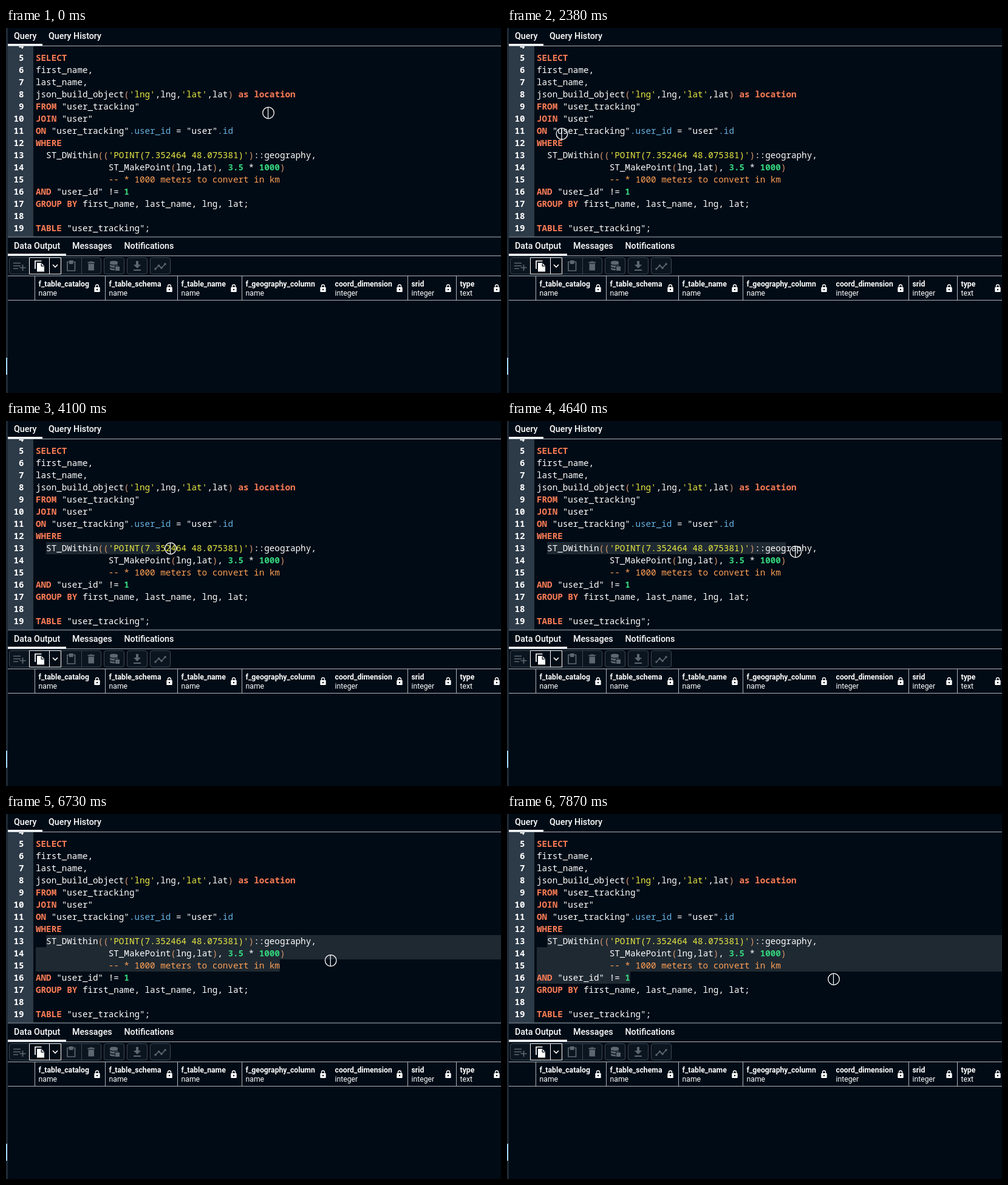
Animation, 815 px wide and 600 px high, one loop 7990 ms. Source, as an HTML page:

```html
<!DOCTYPE html>
<html lang="en">
<head>
<meta charset="utf-8">
<title>Query tool</title>
<style>
  html, body { margin: 0; width: 100%; height: 100%; overflow: hidden; background: #010b15; }
  svg { display: block; }
  text { white-space: pre; fill: #fff; }
  .code text { font: 500 14.25px "Noto Sans Mono", monospace; }
  .code .num { font-weight: 600; text-anchor: end; }
  .comment { fill: #ffa055; }
  .string { fill: #eaea43; }
  .keyword { fill: #fc7c56; font-weight: 700; }
  .column { fill: #67b3e3; }
  .number { fill: #35d37d; font-weight: 700; }
  .bracket { fill: #d6976f; }
  .tab { font: 500 14.25px Roboto, sans-serif; }
  .head { font: 700 12.22px Roboto, sans-serif; }
  .type { font: 400 12.22px Roboto, sans-serif; }
  .rule { fill: #a9b5c1; }
  .icon { fill: none; stroke: #5d6771; stroke-width: 1.7; }
  .icon .box { fill: #0b151f; stroke: #3c4853; stroke-width: 1; }
  .icon .solid { fill: #5d6771; stroke: none; }
  .icon.on, .icon.on .box { stroke: #fff; }
  .icon.on .box { fill: none; }
  .icon.on .solid { fill: #fff; }
</style>
</head>
<body>
<svg width="815" height="600" viewBox="0 0 815 600">
  <rect width="815" height="600" fill="#010b15"/>
  <rect x="3" y="30" width="42" height="313" fill="#2d3a48"/>
  <g id="selection" fill="#1f2932"></g>
  <g id="code" class="code"></g>

  <rect width="815" height="29" fill="#010b15"/>
  <rect class="rule" x="3" y="29" width="812" height="1"/>
  <rect x="3" y="26" width="57" height="3" fill="#fff"/>
  <text class="tab" x="13" y="18">Query</text>
  <text class="tab" x="70" y="18">Query History</text>

  <rect y="343" width="815" height="257" fill="#010b15"/>
  <rect x="3" y="342.5" width="812" height="2" fill="#5a6671"/>
  <rect class="rule" x="3" y="374" width="812" height="1"/>
  <rect x="3" y="371" width="96" height="3" fill="#fff"/>
  <text class="tab" x="13" y="363">Data Output</text>
  <text class="tab" x="109" y="363">Messages</text>
  <text class="tab" x="194.5" y="363">Notifications</text>

  <g class="icon">
    <rect class="box" x="5.5" y="377.5" width="151" height="27" rx="3.5"/>
    <path class="box" d="M124.5 377.5v27"/>
    <rect class="box" x="161.5" y="377.5" width="33" height="27" rx="3.5"/>
    <rect class="box" x="199.5" y="377.5" width="33" height="27" rx="3.5"/>
    <rect class="box" x="237.5" y="377.5" width="33" height="27" rx="3.5"/>
    <path d="M12 386.5h12M12 391h12M12 395.5h8M27.5 389v10M22.5 394h10"/>
    <path d="M101 384.5h12.500v14.500h-12.500z"/>
    <path class="solid" d="M104 382h6.500v6h-6.500z"/>
    <path class="solid" d="M134.500 384.500h3l1-1h3.500l1 1h3v2h-11.500zM135.500 387.500h9.500v11h-9.500z"/>
    <path class="solid" d="M171 385c0-3 13-3 13 0v2c0 3-13 3-13 0zM171 389c3 2 10 2 13 0v2h-5v3c-4 0-8-1-8-2zM171 394c2 1.500 5 1.500 8 1.500v3c-4 0-8-1-8-2zM180 392h7v7h-7z"/>
    <path class="solid" d="M214 383h4v6h4l-6 6-6-6h4zM210 397h12v2h-12z"/>
    <path d="M246 396l5.500-5.500 4.500 4 6-6.500"/>
    <path d="M246 396h0m5.500-5.500h0m4.500 4h0m6-6.500h0" stroke-width="3.600" stroke-linecap="round"/>
  </g>
  <g class="icon on">
    <rect x="38" y="377" width="53" height="28" fill="#010b15" stroke="none"/>
    <path class="box" d="M38.5 377.5h52v27h-52zM71.5 377.5v27"/>
    <path d="M48 396v-13h10.500"/>
    <path class="solid" d="M51 386h7l5 5v9.500H51z"/>
    <path d="M58.200 387v4.300h4.200" stroke="#010b15" stroke-width="1.200"/>
    <path d="M77 389l4 4 4-4"/>
  </g>

  <rect class="rule" x="3" y="407" width="812" height="1"/>
  <rect class="rule" x="3" y="447" width="812" height="1"/>
  <g id="columns"></g>

  <rect width="3" height="600" fill="#1f2a36"/>
  <rect y="542" width="2" height="28" fill="#9fd4f5"/>

  <rect id="caret" width="1.2" height="20" fill="#fff"/>
  <g id="pointer" fill="none" stroke="#fff">
    <circle id="ring" r="9.3" stroke-width="1.3"/>
    <path d="M-.5-9.5V9.5" stroke-width="1.2"/>
  </g>
</svg>
<script>
const LOOP = 7990, LEFT = 49, CHAR = 8.55, ROW = 20, WIDTH = 815;
const $ = id => document.getElementById(id);
const rowTop = line => 39 + (line - 5) * ROW;
const columnX = column => LEFT + column * CHAR;

const sql = `SELECT
first_name,
last_name,
json_build_object('lng',lng,'lat',lat) as location
FROM "user_tracking"
JOIN "user"
ON "user_tracking".user_id = "user".id
WHERE
  ST_DWithin(('POINT(7.352464 48.075381)')::geography,
              ST_MakePoint(lng,lat), 3.5 * 1000)
              -- * 1000 meters to convert in km
AND "user_id" != 1
GROUP BY first_name, last_name, lng, lat;

TABLE "user_tracking";`.split('\n');

const tokens = /(?<comment>--.*)|(?<string>'[^']*')|\b(?<keyword>SELECT|FROM|JOIN|ON|WHERE|AND|GROUP BY|TABLE|as location)\b|(?<column>\.(?:user_id|id)\b)|\b(?<number>3\.5|1000|1)\b|(?<bracket>[()])/g;

function highlight(line) {
  return line.replace(tokens, (match, ...rest) => {
    const kind = Object.entries(rest.at(-1)).find(([, value]) => value)[0];
    return `<tspan class="${kind}">${match}</tspan>`;
  });
}

$('code').innerHTML = ['', ...sql].map((line, i) => {
  const y = rowTop(i + 4) + 15;
  return `<text class="num" x="29.5" y="${y - 0.5}">${i + 4}</text>
    <text x="${LEFT}" y="${y}">${highlight(line)}</text>`;
}).join('');

function tableHead(columns) {
  let left = 47;
  return columns.map(([name, type, width, ruled = true]) => {
    const x = left;
    left += width;
    return `
      ${ruled ? `<rect class="rule" x="${x}" y="408" width="1" height="39"/>` : ''}
      <text class="head" x="${x + 6.5}" y="424.5">${name}</text>
      <text class="type" x="${x + 6.5}" y="440">${type}</text>
      <g transform="translate(${left - 13} 428)">
        <rect x="-4.7" y="-2" width="9.4" height="8" rx="1" fill="#fff"/>
        <path d="M-2.5-2v-1.5a2.5 2.5 0 0 1 5 0V-2" fill="none" stroke="#fff" stroke-width="1.3"/>
        <circle cy="2" r="1.2" fill="#010b15"/>
      </g>`;
  }).join('');
}

$('columns').innerHTML = tableHead([
  ['f_table_catalog', 'name', 116],
  ['f_table_schema', 'name', 119],
  ['f_table_name', 'name', 106],
  ['f_geography_column', 'name', 147],
  ['coord_dimension', 'integer', 126, false],
  ['srid', 'integer', 80],
  ['type', 'text', 80],
]);

// The pointer glides between these; equal neighbours are rests
const path = [
  { t: 0, x: 432, y: 139 },
  { t: 390, x: 582, y: 270 },
  { t: 640, x: 410, y: 366 },
  { t: 890, x: 254, y: 329 },
  { t: 1600, x: 254, y: 329 },
  { t: 2270, x: 95, y: 163 },
  { t: 2680, x: 78, y: 202 },
  { t: 2950, x: 483, y: 208 },
  { t: 3200, x: 69, y: 210 },
  { t: 3400, x: 69, y: 210 },
  { t: 4100, x: 271, y: 209 },
  { t: 4790, x: 532, y: 216 },
  { t: 5140, x: 532, y: 218 },
  { t: 5610, x: 533, y: 239 },
  { t: 6650, x: 534, y: 239 },
  { t: 7000, x: 537, y: 245 },
  { t: 7850, x: 539, y: 258 },
  { t: 7870, x: 538, y: 271 },
];

// Each click puts the caret at a line and column and restarts its blink
const clicks = [
  { t: -690, line: 9, column: 20 },
  { t: 1400, line: 19, column: 22 },
  { t: 3180, line: 13, column: 2 },
];
const dragStart = clicks.at(-1);

function pointerAt(t) {
  const i = path.findLastIndex(key => key.t <= t);
  const a = path[i], b = path[i + 1] ?? { ...a, t: LOOP };
  const part = (t - a.t) / (b.t - a.t);
  return { x: a.x + (b.x - a.x) * part, y: a.y + (b.y - a.y) * part };
}

function selectionRects({ x, y }) {
  const first = dragStart.line;
  const last = Math.max(first, first + Math.floor((y - 200) / ROW));
  let html = '';
  for (let line = first; line <= last; line++) {
    const start = line === first ? dragStart.column : 0;
    const reach = last === first ? Math.floor((x - LEFT) / CHAR - 1.2) : Infinity;
    const end = Math.min(sql[line - 5].length, reach);
    if (end <= start) continue;
    const from = columnX(start);
    const to = line < last ? WIDTH : columnX(end);
    html += `<rect x="${from}" y="${rowTop(line)}" width="${to - from}" height="${ROW}"/>`;
  }
  return html;
}

const show = (id, on) => $(id).style.display = on ? '' : 'none';

function draw(t) {
  const pointer = pointerAt(t);
  const click = clicks.findLast(c => c.t <= t);
  const sinceClick = t - click.t;
  const selected = click === dragStart ? selectionRects(pointer) : '';

  $('pointer').setAttribute('transform', `translate(${pointer.x} ${pointer.y + 0.5})`);
  $('selection').innerHTML = selected;
  $('caret').setAttribute('x', columnX(click.column));
  $('caret').setAttribute('y', rowTop(click.line));
  show('caret', !selected && sinceClick % 1200 < 600);
  show('ring', sinceClick > 320);
}

let origin;
function tick(now) {
  origin ??= now;
  draw((now - origin) % LOOP);
  requestAnimationFrame(tick);
}
draw(0);
requestAnimationFrame(tick);
</script>
</body>
</html>
```
